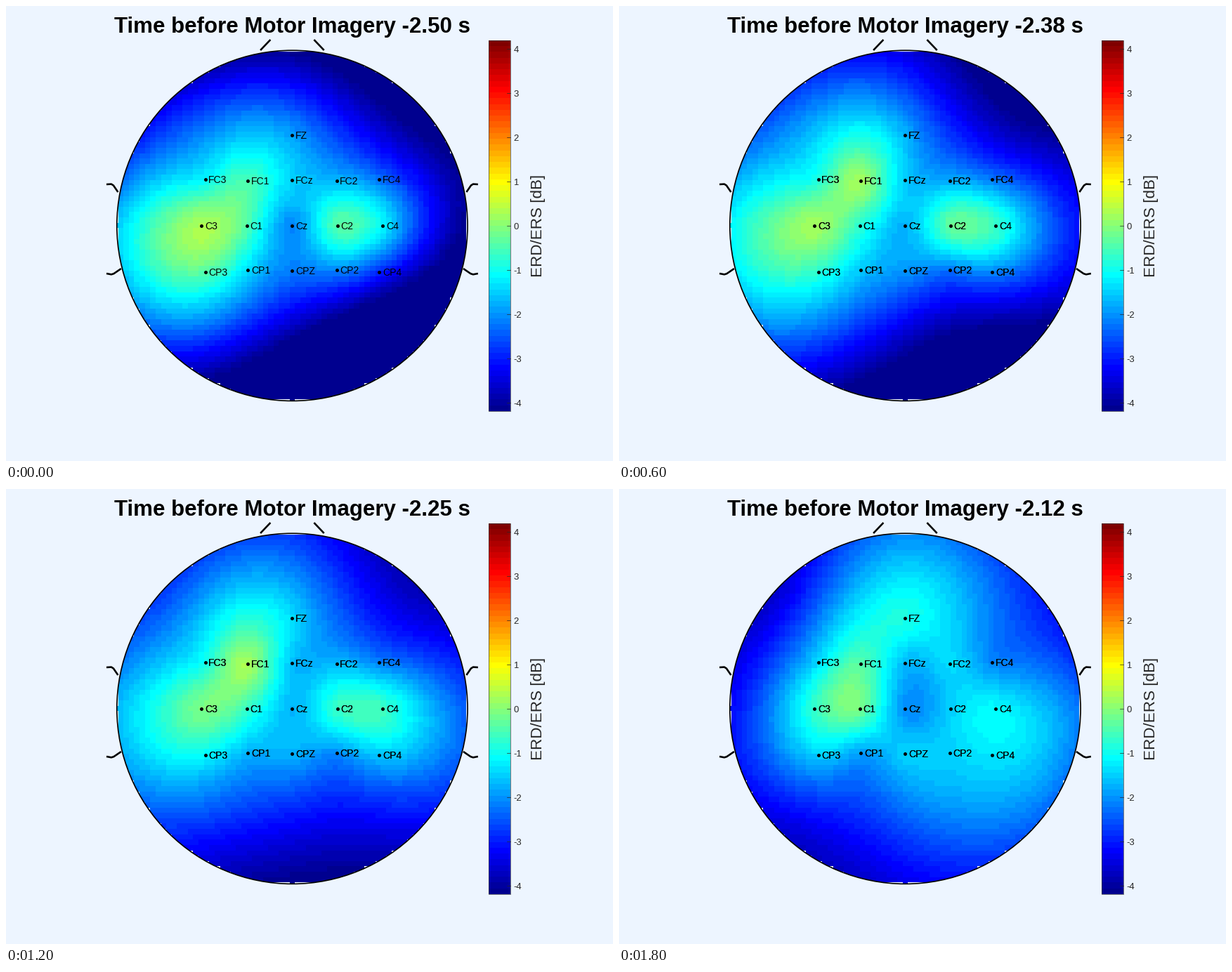
Animation, 864 px wide and 648 px high, one loop 2.1 s. Source, as a matplotlib script:

```python
import numpy as np
import matplotlib
matplotlib.rcParams["font.family"] = "Liberation Sans"
import matplotlib.pyplot as plt
from matplotlib.animation import FuncAnimation
from matplotlib.colors import ListedColormap
from matplotlib.patches import Circle, Rectangle

W, H, DPI = 864, 648, 72          # 72 dpi: one point is one pixel
CX, CY, R = 407.4, 312.8, 249.6   # head
LIM = 4.19                        # colour limits in dB
STEPS = 7
GRID, SPAN = 67, 1.0075           # the grid reaches just past the head
DARK = "#262626"

# dB at the start and the end, with an optional swell in between
SITES = {
    "FZ": (-1.9, -.9, -.2),
    "FC3": (-1.15, -1.4, .4), "FC1": (-.5, -.4, .8), "FCz": (-1.5, -1.7),
    "FC2": (-1.7, -1.4, -.2), "FC4": (-2.3, -2.1),
    "C3": (.3, -.7, .3), "C1": (-.45, -.15, -.45), "Cz": (-2.1, -2.05, .4),
    "C2": (-.4, -1.5, .55), "C4": (-1.2, -1.1, .6),
    "CP3": (-.4, -1.5), "CP1": (-1.4, -1.9), "CPZ": (-2.2, -1.5),
    "CP2": (-2.1, -1.5, -.4), "CP4": (-2.9, -1.3, .3),
}
# the same along the rim, clockwise from the nose
RIM = [(-4.2, -2.1), (-4.6, -2.9, -.45), (-4.2, -2.3, .5), (-6.3, -2.5, .4),
       (-5.8, -3.4), (-3.0, -3.6, .6), (-1.6, -3.2, 1.1), (-3.4, -3.6, .9)]


def site_xy(name):
    """Pixel offset from the vertex, read off the electrode's label."""
    row = {"F": -2, "FC": -1, "C": 0, "CP": 1}[name[:-1]]
    tag = name[-1]
    col = 0 if tag in "zZ" else (int(tag) + 1) // 2 * (-1) ** int(tag)
    c = abs(col)
    return (64.5 * col - 1.3 * row**2 * c * col,
            row * (64.4 - 2.75 * c + 1.75 * c**2))


def power(s, start, end, swell=0):
    return start + (end - start) * s + swell * np.sin(np.pi * s)


def jet(n=64):
    i = np.arange(n)
    bands = [np.clip((24 - abs(i - c)) / 16, 0, 1) for c in (47, 31, 15)]
    return ListedColormap(np.stack(bands, axis=1))


def spline_kernel(a, b):
    d = np.linalg.norm(a[:, None] - b[None], axis=2)
    d = np.maximum(d, 1e-9)
    return d**2 * (np.log(d) - 1)


angle = np.arange(len(RIM)) * 2 * np.pi / len(RIM)
rim_xy = np.column_stack([np.sin(angle), -np.cos(angle)])
knots = np.vstack([np.array([site_xy(n) for n in SITES]) / R, rim_xy])

axis = np.linspace(-SPAN, SPAN, GRID)
gx, gy = np.meshgrid(axis, axis)
outside = np.hypot(gx, gy) > SPAN + 1e-6
outside[0, :] = True      # flat shading drops the last row and column
outside[:, -1] = True

knot_kernel = spline_kernel(knots, knots)
grid_kernel = spline_kernel(np.column_stack([gx.ravel(), gy.ravel()]), knots)


def scalp(k):
    """Biharmonic spline through the electrode and rim values."""
    s = k / (STEPS - 1)
    values = [power(s, *v) for v in [*SITES.values(), *RIM]]
    field = grid_kernel @ np.linalg.solve(knot_kernel, np.array(values))
    return np.ma.array(field.reshape(GRID, GRID), mask=outside)


fig = plt.figure(figsize=(W / DPI, H / DPI), dpi=DPI, facecolor=(.93, .96, 1))
ax = fig.add_axes([0, 0, 1, 1])
cmap = jet()


def line(xs, ys, lw=2.6):
    ax.plot(xs, ys, color="black", lw=lw, solid_capstyle="butt",
            solid_joinstyle="round", zorder=4)


# scalp map
half = R * SPAN * (1 + 1 / (GRID - 1))
image = ax.imshow(scalp(0), cmap=cmap, vmin=-LIM, vmax=LIM,
                  interpolation="nearest", aspect="auto", origin="upper",
                  extent=(CX - half, CX + half, CY + half, CY - half))
image.set_clip_path(Circle((CX, CY), R, transform=ax.transData))
ax.add_patch(Circle((CX, CY), R, fill=False, ec="black", lw=1.7, zorder=3))

# nose and ears, cut off by the plot box
for s in (-1, 1):
    line([CX + s * 31, CX + s * 45.3], [48, 63])
    line([CX + s * d for d in (264.4, 257.5, 254.5, 248)],
         [254, 253.6, 255.5, 265])
    line([CX + s * d for d in (264.4, 257.5, 254, 243.5)],
         [381, 382.3, 381.2, 374])

# electrodes; the second copy makes the redrawn labels heavier
echo = []
for name in SITES:
    dx, dy = site_xy(name)
    x, y = CX + dx, CY + dy
    ax.plot(x, y, "o", color="black", ms=5, mew=0, zorder=5)
    ax.text(x + 4.6, y + 5, name, size=14, zorder=5)
    echo.append(ax.text(x + 4.6, y + 5, name, size=14, zorder=5))

# colour bar
X0, X1, TOP, BOTTOM = 687, 718, 49, 577
ax.imshow(np.arange(64)[::-1, None], cmap=cmap, vmin=0, vmax=63,
          interpolation="nearest", aspect="auto", origin="upper",
          extent=(X0, X1, BOTTOM, TOP))
ax.add_patch(Rectangle((X0, TOP), X1 - X0, BOTTOM - TOP, fill=False,
                       ec=DARK, lw=.6, zorder=3))
for v in range(-4, 5):
    y = 313 - v * (BOTTOM - TOP) / (2 * LIM)
    ax.plot([X1 - 5, X1], [y, y], color=DARK, lw=.7, zorder=4)
    ax.text(722.5, y + 4.7, str(v), size=13, color=DARK)
ax.text(763, 313, "ERD/ERS [dB]", size=22.4, color=DARK, rotation=90,
        rotation_mode="anchor", ha="center", va="baseline")

title = ax.text(CX, 38, "", size=31.2, weight="bold", ha="center")

ax.set_xlim(0, W)
ax.set_ylim(H, 0)
ax.axis("off")


def update(k):
    image.set_data(scalp(k))
    title.set_text(f"Time before Motor Imagery {-2.5 + k / 16:.2f} s")
    for label in echo:
        label.set_visible(k > 0)
    return [image, title, *echo]


anim = FuncAnimation(fig, update, frames=STEPS, interval=300,
                     repeat=True, repeat_delay=0, blit=False)
plt.show()
```
